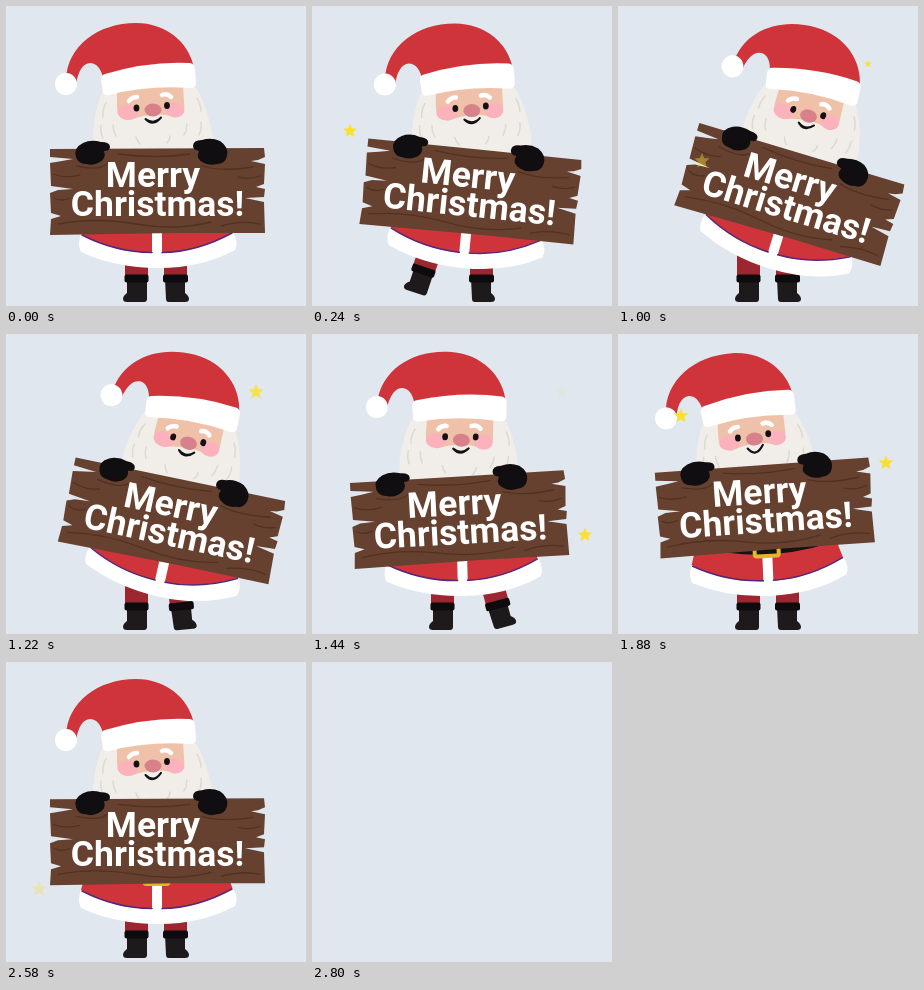
Recreate the animation shown at these times as an HTML page. Size 300x300 px, loop 2820 ms.

```html
<!DOCTYPE html>
<html lang="en">
<head>
<meta charset="utf-8">
<title>Merry Christmas!</title>
<style>
html, body { margin: 0; width: 100%; height: 100%; overflow: hidden; background: #e0e7ef; }
svg { display: block; width: 100vw; height: 100vh; }
text { font: 700 35.5px Roboto, Arial, sans-serif; fill: #fff; text-anchor: middle; }
.line { fill: none; stroke-linecap: round; stroke-linejoin: round; }
</style>
</head>
<body>
<svg viewBox="0 0 300 300">
  <g id="scene">
    <g id="legL">
      <path fill="#9c2731" d="M119 225h23v46h-23z"/>
      <path fill="#1e1a1b" d="M121 273h20v20q0 3-3 3h-17q-4 0-4-3 0-3 4-6z"/>
      <rect x="118.500" y="268.500" width="24" height="8" rx="2" fill="#0d0b0c"/>
    </g>
    <g id="legR">
      <path fill="#9c2731" d="M158 225h23v46h-23z"/>
      <path fill="#1e1a1b" d="M159 273h20v14q4 3 4 6 0 3-4 3h-16q-3 0-3-3z"/>
      <rect x="157" y="268.500" width="25" height="8" rx="2" fill="#0d0b0c"/>
    </g>

    <g id="body">
      <path fill="#d0343b" d="M97 150H203L219 205 227 228Q151 272 75 228L81 205Z"/>
      <path class="line" stroke="#151213" stroke-width="10" d="M89 207Q150 224 213 207"/>
      <path fill="#fff" d="M146 220h10v30h-10z"/>
      <rect x="138.500" y="209" width="24" height="13" rx="2" fill="#151213" stroke="#e5b52f" stroke-width="4"/>
      <path fill="#fff" d="M75 228Q71 239 75 246 110 262 152 262 196 262 229 244 233 237 227 226 190 247 151 247 108 247 75 228Z"/>
      <path class="line" stroke="#55277a" stroke-width="1.500" d="M76 229Q109 246 146 246.500M156 246.500Q191 246 226 227"/>
    </g>

    <g id="head">
      <path fill="#f1eeea" d="M99 80Q90 98 88 118 85 134 91 150 98 164 146 166 196 164 205 150 209 134 203 114 199 96 188 78Z"/>
      <path class="line" stroke="#ddd9d1" stroke-width="1.500" d="M100 97q-4 7-3 14M95 119q-1 7 2 13M107 119q0 6 3 11M191 92q4 7 4 13M195 116q1 7-2 13M181 118q0 6-3 11M130 131q1 4 4 7M164 130q0 4-3 7"/>
      <path fill="#f0c1a9" d="M111 82V101Q112 114 124 114 138 109 147 109 158 107 169 111.500 180 109 178 96L177 78Z"/>
      <ellipse cx="122" cy="106.500" rx="10.500" ry="7.500" fill="#fbb2bc"/>
      <ellipse cx="169" cy="104" rx="9.500" ry="7.500" fill="#fbb2bc"/>
      <ellipse cx="147" cy="104" rx="8.500" ry="6.500" fill="#d7818a"/>
      <ellipse cx="130.500" cy="102" rx="2.900" ry="3.500" fill="#141011"/>
      <ellipse cx="161" cy="99.500" rx="2.900" ry="3.500" fill="#141011"/>
      <path class="line" stroke="#fff" stroke-width="4.500" d="M123 95Q126 91 131 91M156 89Q161 87 165 91"/>
      <path id="mouth" class="line" stroke="#141011" stroke-width="2"/>
      <path fill="#d0343b" d="M60 74C61 40 92 17 130 17 160 17 183 36 188 62L97 71Q93 57 84 57 73 58 70 79Z"/>
      <path fill="#fff" d="M95 74Q95 69 99 68 142 55 184 57 189 58 189 63L190 78Q189 82 184 82 142 79 103 89 98 90 97 86Z"/>
      <circle cx="60" cy="78" r="11" fill="#fff"/>
    </g>

    <g id="board">
      <path fill="#66412f" d="M44 143 150 142.500 258 142 259 151 252 154 245 155 259 158 258 178 250 181 259 183 258 191 239 192 258 196 259 227 170 227 44 229 45 213 55 210 45 207 44 187 52 184 67 183 45 180 44 157 56 155 67 153 44 151Z"/>
      <path class="line" stroke="#513121" stroke-width="1.300" d="M70 160Q92 165 101 158M196 160Q215 166 247 161M48 192Q56 196 64 192M52 218Q90 211 130 218T205 216M215 220Q236 214 254 218M112 148Q150 153 184 148M232 171Q243 174 254 170M47 168Q60 173 74 169"/>
      <text x="147" y="181">Merry</text>
      <text x="151.500" y="210">Christmas!</text>
      <path fill="#100e10" d="M70 151Q67 142 77 137 85 133 95 136 104 136 104 141 104 145 98 145 101 153 92 157 86 160 80 158 72 158 70 151Z"/>
      <path fill="#100e10" d="M221 150Q223 141 214 135 205 131 196 134 187 134 187 140 187 144 193 145 189 153 198 157 204 160 211 158 219 158 221 150Z"/>
    </g>
    <g id="stars" fill="#fbe02f"></g>
  </g>
</svg>
<script>
const LOOP = 2820, END = 2800, STAR_LIFE = 560;
const $ = id => document.getElementById(id);

// Eased step from 0 to 1 between times a and b
const ease = (t, a, b) => {
  const s = Math.min(1, Math.max(0, (t - a) / (b - a)));
  return s * s * (3 - 2 * s);
};

// Lean right, swing over to the left, settle back to the middle
const sway = (t, right, left, [a, b], [c, d]) =>
  right * ease(t, a, b) + (left - right) * ease(t, c, d) - left * ease(t, 1900, 2450);

const place = (id, angle, px, py, dx = 0, dy = 0) =>
  $(id).setAttribute("transform", `translate(${dx} ${dy}) rotate(${angle} ${px} ${py})`);

const starPath = Array.from({ length: 10 }, (_, i) => {
  const a = i * Math.PI / 5, r = i % 2 ? 0.45 : 1;
  return [r * Math.sin(a), -r * Math.cos(a)].map(v => v.toFixed(3));
}).join(" ");

// x, y, time of birth
const stars = [
  [38, 125, 10], [84, 155, 560], [250, 58, 900], [273, 201, 1200],
  [63, 82, 1620], [268, 129, 1620], [33, 227, 2110]
].map(([x, y, born]) => {
  const node = document.createElementNS("http://www.w3.org/2000/svg", "polygon");
  node.setAttribute("points", starPath);
  $("stars").append(node);
  return { x, y, born, node };
});

function drawStar({ x, y, born, node }, t) {
  const p = (t - born) / STAR_LIFE;
  const shown = p > 0 && p < 1;
  const size = shown ? 8 * Math.sin(Math.min(1, p * 1.8) * Math.PI / 2) : 0;
  node.setAttribute("transform", `translate(${x} ${y}) scale(${size})`);
  node.setAttribute("opacity", shown ? Math.min(1, 2 - 2 * p) : 0);
}

function draw(t) {
  $("scene").style.visibility = t < END ? "visible" : "hidden";

  const kickL = ease(t, 60, 380) - ease(t, 440, 680);
  const kickR = ease(t, 1100, 1400) - ease(t, 1440, 1660);
  place("legL", 31 * kickL, 145, 210);
  place("legR", -15 * kickR, 170, 210);

  place("body", sway(t, 17, -2.5, [0, 640], [1100, 1500]), 150, 260);

  const lift = ease(t, 1500, 2020) - ease(t, 2400, 2720);
  place("board", sway(t, 17, -3.8, [0, 600], [1100, 1480]), 150, 255, 0, -14 * lift);

  const headX = sway(t, 43.5, -10.5, [0, 670], [1100, 1600]);
  const headY = sway(t, 6, 1, [120, 760], [1100, 1600]);
  place("head", sway(t, 16.5, -3.5, [220, 760], [1140, 1680]), 147, 104, headX, headY);

  const low = 121 + 3 * lift, right = 111.5 - 1.5 * lift;
  $("mouth").setAttribute("d", `M139.5 113Q147 ${low} 155 ${right}Q148 ${low - 2 + 2 * lift} 139.5 113Z`);
  $("mouth").setAttribute("fill", "#141011");

  stars.forEach(s => drawStar(s, t));
}

const start = performance.now();
function tick() {
  draw((performance.now() - start) % LOOP);
  requestAnimationFrame(tick);
}
tick();
</script>
</body>
</html>
```
